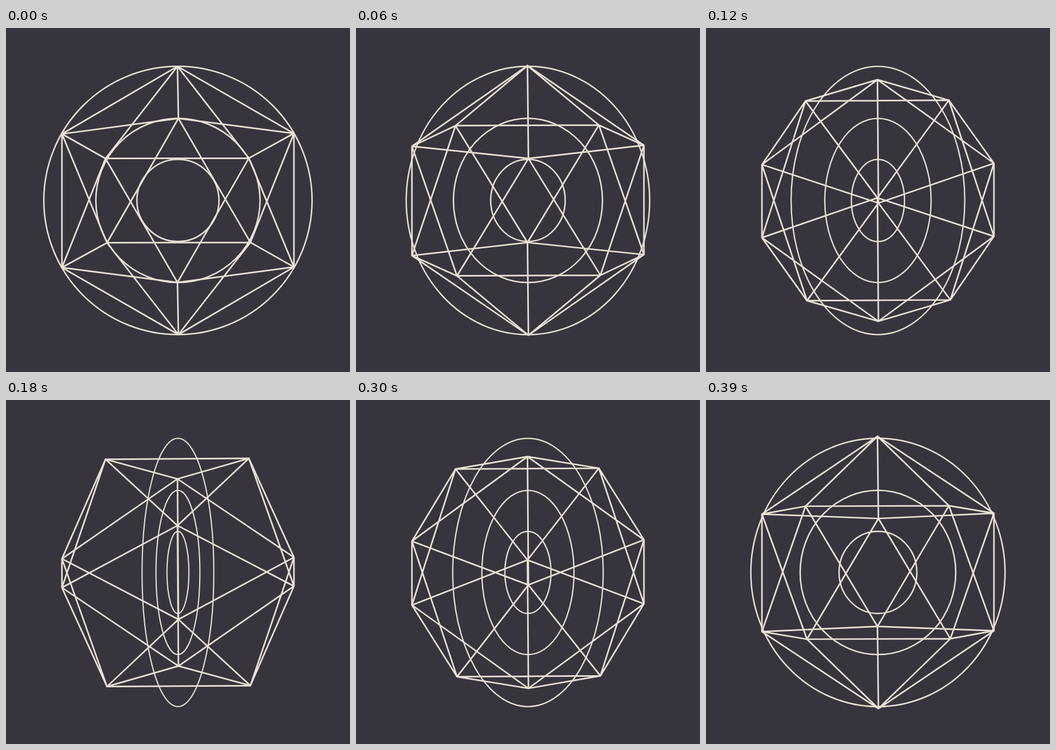
Write an HTML page with a canvas that moves like this. It is 595x595 px and loops after 0.42 s.

```html
<!DOCTYPE html>
<html lang="en">
<head>
<meta charset="utf-8">
<title>Rotating icosahedron</title>
<style>
  html, body { margin: 0; width: 100%; height: 100%; overflow: hidden; background: #37343e; }
  canvas { display: block; }
</style>
</head>
<body>
<canvas id="stage" width="595" height="595"></canvas>
<script>
const ctx = document.getElementById('stage').getContext('2d');
const STEP = 30, STEPS = 14;
const TURN_STEPS = 14.5; // a full turn is slightly longer than the loop
const PHI = (1 + Math.sqrt(5)) / 2;
const DEGREE = Math.PI / 180;
const SCALE = 124, TILT = -0.0065;
const RINGS = [232, 142, 71];

const vertices = [];
for (const s of [-1, 1]) {
  for (const t of [-PHI, PHI]) {
    vertices.push([0, s, t], [s, t, 0], [t, 0, s]);
  }
}

const edges = [];
vertices.forEach((a, i) => {
  for (const b of vertices.slice(i + 1)) {
    if (Math.hypot(a[0] - b[0], a[1] - b[1], a[2] - b[2]) < 2.1) edges.push([a, b]);
  }
});

function draw(time) {
  const turn = Math.floor(time / STEP) % STEPS / TURN_STEPS;
  const angle = (138 * turn - 68.7) * DEGREE;
  const cos = Math.cos(angle), sin = Math.sin(angle);

  // The solid leans slightly around its own z axis, then spins around x.
  const project = ([x, y, z]) => [
    (x - y * TILT) * SCALE,
    ((y + x * TILT) * cos + z * sin) * SCALE
  ];

  ctx.setTransform(1, 0, 0, 1, 0, 0);
  ctx.fillStyle = '#37343e';
  ctx.fillRect(0, 0, 595, 595);
  ctx.translate(297.4, 298.3);
  ctx.strokeStyle = '#e9e1d3';
  ctx.lineCap = 'round';

  const squash = Math.abs(Math.cos(Math.PI * turn));
  ctx.lineWidth = 1.9 + 0.6 * squash;
  for (const radius of RINGS) {
    ctx.beginPath();
    ctx.ellipse(0, 0, radius * squash, radius, 0, 0, 2 * Math.PI);
    ctx.stroke();
  }

  ctx.lineWidth = 2.7;
  ctx.beginPath();
  for (const [a, b] of edges) {
    ctx.moveTo(...project(a));
    ctx.lineTo(...project(b));
  }
  ctx.stroke();
}

const start = performance.now();
function tick() {
  draw(performance.now() - start);
  requestAnimationFrame(tick);
}
tick();
</script>
</body>
</html>
```
